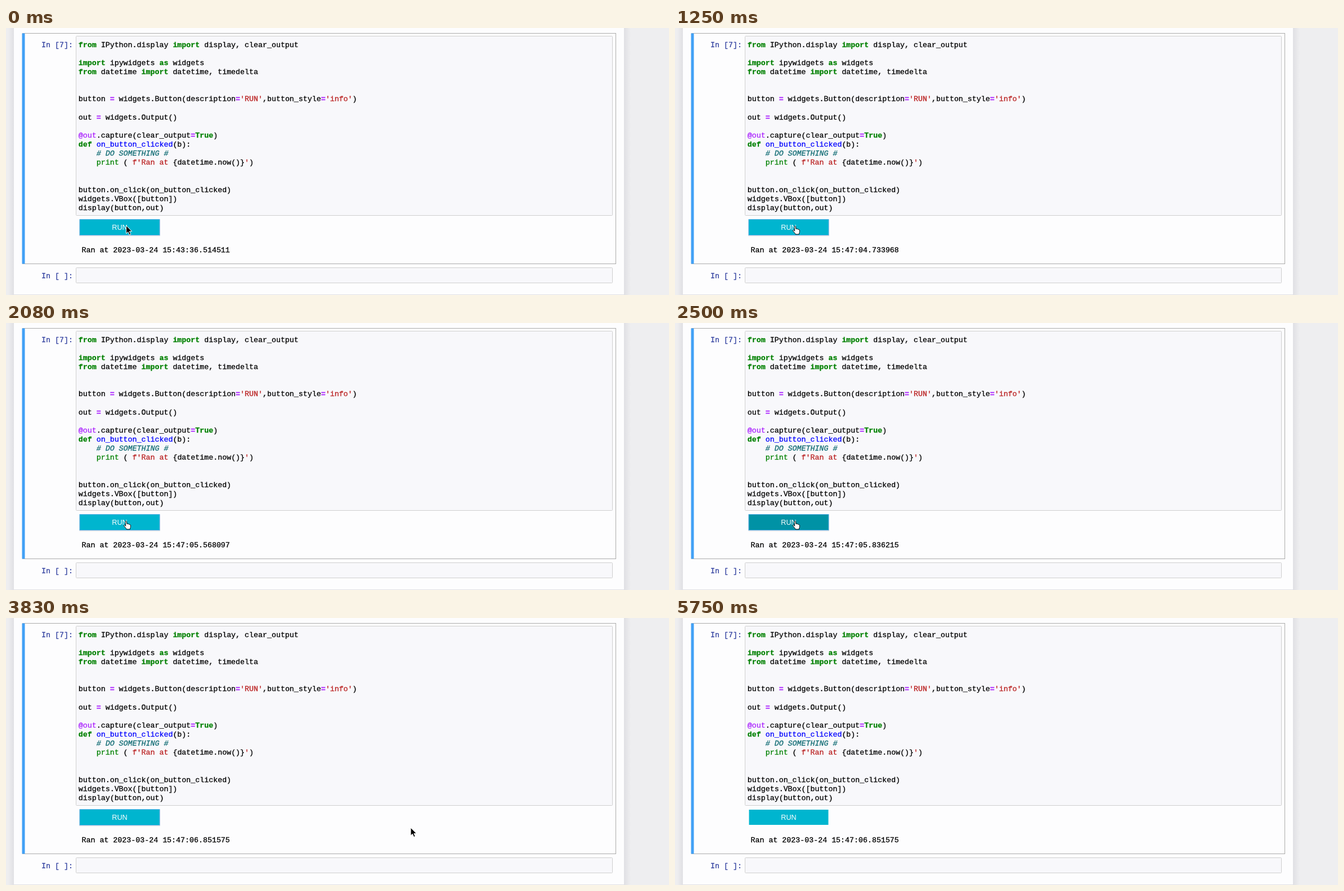
Animation, 1178 px wide and 475 px high, one loop 5910 ms. Source, as an HTML page:

```html
<!DOCTYPE html>
<html lang="en">
<head>
<meta charset="utf-8">
<title>Notebook run button</title>
<style>
html, body { margin: 0; width: 100%; height: 100%; overflow: hidden; background: #eeeef0; }
svg { display: block; width: 1178px; height: 475px; }
text { white-space: pre; }
.mono, .math { color: #000; fill: currentColor; stroke: currentColor; stroke-width: .3px; }
.mono { font: 13.3px "Liberation Mono", "Courier New", monospace; }
.mono tspan { fill: currentColor; stroke: currentColor; }
.k { color: #008000; font-weight: bold; }
.o { color: #aa22ff; font-weight: bold; }
.d { color: #aa22ff; }
.s { color: #ba2121; }
.f { color: #0000ff; }
.c { color: #0f6b73; font-style: italic; }
.b { color: #008000; }
.in { color: #303f9f; }
.out { color: #d84315; }
.math { font: 17px "Liberation Serif", serif; stroke-width: .2px; }
.math .i { font-style: italic; }
.math .sup { font-size: 12px; }
.box { fill: #f8f8fb; stroke: #cfcfcf; }
.label { font: 12.7px "Liberation Sans", Arial, sans-serif; fill: #fff; text-anchor: middle; }
</style>
</head>
<body>
<svg viewBox="0 0 1178 475">
  <defs>
    <linearGradient id="edgeL"><stop offset="0" stop-color="#eeeef0"/><stop offset="1" stop-color="#e0e0e4"/></linearGradient>
    <linearGradient id="edgeR"><stop offset="0" stop-color="#e0e0e4"/><stop offset="1" stop-color="#eeeef0"/></linearGradient>
  </defs>
  <rect width="1178" height="475" fill="#eeeef0"/>
  <rect x="4" width="10" height="475" fill="url(#edgeL)"/>
  <rect x="1098" width="12" height="475" fill="url(#edgeR)"/>
  <rect x="14" width="1084" height="474" fill="#fdfdfe"/>
  <rect x="14" y="474" width="1084" height="1" fill="#e0e0e4"/>

  <g id="above">
    <path d="M124 .5H1078" stroke="#cfcfcf"/>
    <text class="mono out" x="54.5" y="19">Out[23]:</text>
    <text class="math" y="23"><tspan class="i" x="130">x</tspan><tspan x="142.5">+</tspan><tspan class="i" x="157">y</tspan><tspan class="sup" x="165" y="15.5">2</tspan><tspan x="176" y="23">+</tspan><tspan x="190.5">sin</tspan><tspan x="212">(</tspan><tspan class="i" x="218.5">z</tspan><tspan x="225.5">)</tspan></text>
  </g>

  <rect id="cell" x="29.5" width="1054" fill="none" stroke="#ababab"/>
  <rect id="bar" x="28.5" width="5" fill="#42a1f6"/>

  <g id="body">
    <text class="mono in" x="63" y="33.5">In [7]:</text>
    <rect class="box" x="124.5" y="14.5" width="953" height="319" rx="1"/>
    <g id="code" class="mono"></g>
    <g id="focus">
      <rect x="130" y="341" width="144" height="29.5" rx="1" fill="#000" opacity=".1"/>
      <rect x="130.5" y="340" width="143" height="29" fill="#5aaee8"/>
    </g>
    <rect id="button" x="131.5" y="341" width="141" height="27"/>
    <text class="label" x="202" y="359">RUN</text>
  </g>
  <text id="stamp" class="mono" x="134.5" y="399"></text>

  <text class="mono in" x="63" y="444.5">In [ ]:</text>
  <rect class="box" x="124.5" y="426.5" width="953" height="27" rx="1"/>

  <g id="cursor">
    <path id="arrow" d="M0 0V14.2L3.3 11.2 5.7 16.6 8.2 15.5 5.8 10.3H10.2Z" fill="#000" stroke="#fff" stroke-linejoin="round"/>
    <path id="hand" d="M3.2 1.4C3.2 0 5.4 0 5.5 1.4L5.9 5.6C6.4 4.7 8 4.9 8.1 6 8.7 5.2 10.2 5.5 10.3 6.7 11.1 6.1 12.4 6.6 12.4 7.9V10.4C12.4 12.2 11.4 12.8 11.3 15H5.1C4.8 13.2 2.8 11.8 .6 8.9-.1 7.8 1.4 7 2.4 7.9L3.7 9.2Z" fill="#fff" stroke="#000" stroke-linejoin="round"/>
    <path id="beam" d="M-3 .5Q0 .5 0 2Q0 .5 3 .5M0 2V12M-2 8.5H2M-3 13.5Q0 13.5 0 12Q0 13.5 3 13.5" fill="none" stroke="#000" stroke-width=".9"/>
  </g>
</svg>
<script>
const LOOP = 5910, SHIFT = 28;
const $ = id => document.getElementById(id);

const code = `<k>from</k> IPython.display <k>import</k> display, clear_output

<k>import</k> ipywidgets <k>as</k> widgets
<k>from</k> datetime <k>import</k> datetime, timedelta


button <o>=</o> widgets.Button(description<o>=</o><s>'RUN'</s>,button_style<o>=</o><s>'info'</s>)

out <o>=</o> widgets.Output()

<d>@out</d>.capture(clear_output<o>=</o><k>True</k>)
<k>def</k> <f>on_button_clicked</f>(b):
    <c># DO SOMETHING #</c>
    <b>print</b> ( <s>f'Ran at </s>{datetime.now()}<s>'</s>)


button.on_click(on_button_clicked)
widgets.VBox([button])
display(button,out)`;

$('code').innerHTML = code.split('\n').map((line, i) => {
  const spans = line.replace(/<(\w)>/g, '<tspan class="$1">').replace(/<\/\w>/g, '</tspan>');
  return `<text x="128.8" y="${33.5 + i * 16.15}">${spans}</text>`;
}).join('');

const at = (cursor, x, y) => ({ cursor, x, y });
const press = { down: true };
const ran = time => ({ down: false, cleared: false, time });
const hand = at('hand', 209, 352);

// Each step changes part of the state and holds until the next one.
const steps = [
  [0, { ...at('arrow', 213.5, 351.5), time: '43:36.514511', down: false, cleared: false, focus: true }],
  [170, hand],
  [250, press],
  [330, ran('47:03.894126')],
  [750, press],
  [830, { ...at('beam', 213, 346), down: false, cleared: true }],
  [920, { ...hand, ...ran('47:04.391750') }],
  [1080, press],
  [1170, ran('47:04.733968')],
  [1420, press],
  [1500, ran('47:05.018342')],
  [1670, press],
  [1750, ran('47:05.294603')],
  [1920, press],
  [2000, ran('47:05.568097')],
  [2170, press],
  [2330, ran('47:05.836215')],
  [2500, press],
  [2580, ran('47:06.067481')],
  [2670, press],
  [2750, ran('47:06.284717')],
  [2920, press],
  [3000, ran('47:06.562930')],
  [3250, press],
  [3330, ran('47:06.851575')],
  [3830, at('arrow', 719, 373)],
  [3920, at('arrow', 850.5, 415.5)],
  [4170, at('arrow', 878, 420)],
  [4250, at('arrow', 902, 424)],
  [4330, at('arrow', 912.5, 425.5)],
  [4920, at('arrow', 968, 442)],
  [5000, at('arrow', 1085.5, 462)],
  [5080, { cursor: '' }],
  [5750, { focus: false }]
];

const show = (id, on) => { $(id).style.display = on ? '' : 'none'; };

function draw(t) {
  const s = Object.assign({}, ...steps.filter(step => step[0] <= t).map(step => step[1]));
  const dy = s.cleared ? SHIFT : 0;
  $('body').setAttribute('transform', `translate(0 ${dy})`);
  for (const id of ['cell', 'bar']) {
    $(id).setAttribute('y', 9.5 + dy);
    $(id).setAttribute('height', 410 - dy);
  }
  $('button').setAttribute('fill', s.down ? '#0092a5' : '#00b5cf');
  $('stamp').textContent = s.cleared ? '' : `Ran at 2023-03-24 15:${s.time}`;
  show('above', s.cleared);
  show('focus', s.focus);
  for (const id of ['arrow', 'hand', 'beam']) show(id, s.cursor === id);
  $('cursor').setAttribute('transform', `translate(${s.x} ${s.y})`);
}

const start = performance.now();
function tick() {
  draw((performance.now() - start) % LOOP);
  requestAnimationFrame(tick);
}
tick();
</script>
</body>
</html>
```
